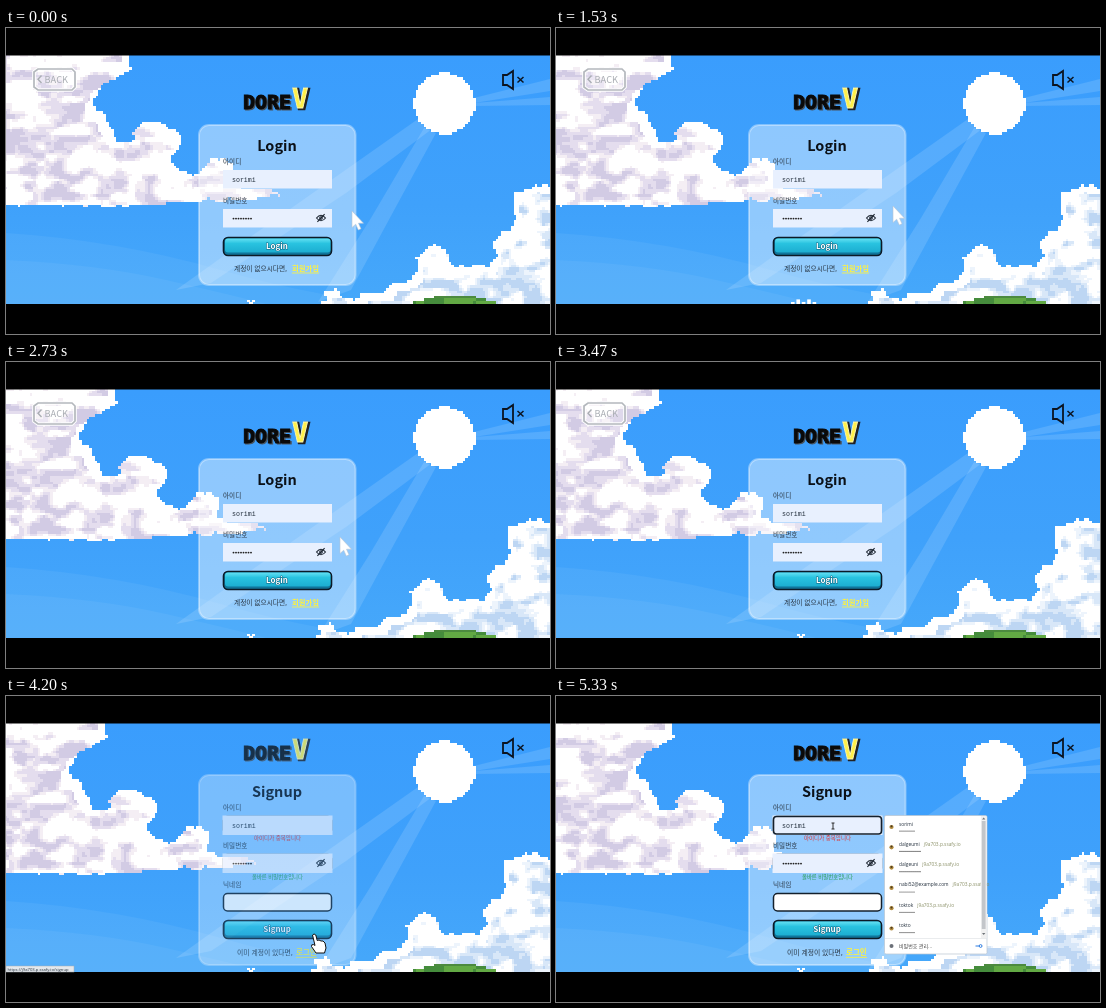
An HTML page with a canvas for the animation above (5390 ms loop, 544 px wide and 306 px high).

```html
<!DOCTYPE html>
<html lang="ko">
<head>
<meta charset="utf-8">
<title>Login</title>
<style>
  html, body { margin: 0; width: 100%; height: 100%; overflow: hidden; background: #000; }
  canvas, svg { position: absolute; left: 0; top: 0; width: 100%; height: 100%; display: block; }
  text { font-family: "Noto Sans CJK KR", "Noto Sans CJK", sans-serif; fill: #26323f; white-space: pre; }
  .mid { text-anchor: middle; }
  .mono { font-family: "Liberation Mono", monospace; font-size: 6.6px; }
  .logo { font-family: "DejaVu Sans Mono", monospace; font-weight: 700; }
  .title { font-size: 14.5px; font-weight: 700; fill: #0b1118; }
  .list { font-family: "Open Sans", sans-serif; font-size: 4.8px; }
</style>
</head>
<body>
<canvas id="sky" width="544" height="306"></canvas>
<svg id="ui" viewBox="0 0 544 306" preserveAspectRatio="none"></svg>
<script>
const LOOP = 5390, CELL = 2.6;
const $ = id => document.getElementById(id);
const ctx = $('sky').getContext('2d');

// ---------- pixel scenery ----------
const hash = (i, j) => { const s = Math.sin(i * 127.1 + j * 311.7) * 43758.5453; return s - Math.floor(s); };
const mix = (a, b, k) => a + (b - a) * k;
function noise(x, y) {
  const i = Math.floor(x), j = Math.floor(y), u = x - i, v = y - j;
  return mix(mix(hash(i, j), hash(i + 1, j), u), mix(hash(i, j + 1), hash(i + 1, j + 1), u), v);
}
function shape(d) { return new Path2D('M' + d + 'Z'); }

// Rasterises a path into coarse cells; ragged adds a jagged rim.
function sprite(path, color, ragged = 0) {
  const c = document.createElement('canvas');
  c.width = 240; c.height = 118;
  const g = c.getContext('2d');
  const inside = (x, y) => ctx.isPointInPath(path, x, y);
  for (let j = 10; j < 107; j++) for (let i = 0; i < 240; i++) {
    const x = (i + .5) * CELL - 40, y = (j + .5) * CELL;
    const w = ragged * (noise(x / 5, y / 5) - .5);
    if (!inside(x + w, y + w)) continue;
    g.fillStyle = color(x, y, inside);
    g.fillRect(i, j, 1, 1);
  }
  return c;
}
function stamp(s, dx) {
  ctx.drawImage(s, dx - 40, 0, s.width * CELL, s.height * CELL);
}

const leftCloud = sprite(shape(
  '-40 20 101 20 101 43 92 47 88 52 72 57 70 66 64 70 66 82 74 84 80 98 86 104 86 112 104 114 ' +
  '108 98 115 93 133 93 139 101 150 104 153 118 147 125 141 131 148 140 160 146 176 142 180 132 ' +
  '192 129 203 135 205 146 200 153 212 158 225 162 240 160 245 164 258 166 240 168 228 170 200 172 ' +
  '150 174 110 177 -40 178'),
  (x, y, inside) => {
    if (!inside(x + 9, y - 6) && y < 160) return '#fff';
    const n = noise(x / 15, y / 8) * .7 + noise(x / 6 + 9, y / 4) * .3 + (x < 75 && y > 60 ? .06 : 0);
    return n > .66 ? '#d2cbe4' : n > .56 ? '#e4ddee' : n > .49 ? '#f4eef4' : '#fff';
  }, 5);

const rightCloud = sprite(shape(
  '298 280 309 272 311 262 322 262 326 268 338 272 348 266 372 264 376 256 394 252 400 246 402 232 ' +
  '408 228 409 219 416 217 428 219 433 228 434 236 444 240 462 236 474 240 480 226 478 214 486 206 ' +
  '494 200 500 192 498 170 504 162 516 157 532 158 544 164 575 170 575 280'),
  (x, y, inside) => {
    if (!inside(x - 6, y - 8)) return '#fff';
    const n = noise(x / 14 + 3, y / 8) * .7 + noise(x / 6, y / 4) * .3 + (y > 240 ? .06 : 0);
    return n > .64 ? '#bdd6f3' : n > .54 ? '#d8e7f8' : n > .48 ? '#edf4fc' : '#fff';
  }, 5);

const disc = new Path2D();
disc.arc(438.5, 75.5, 30.5, 0, 7);
const sun = sprite(disc, () => '#fff');

const hill = sprite(shape('404 280 408 274 420 271 432 268 464 268 478 271 489 274 493 280'),
  (x, y) => y < 271 ? '#4c8a3f' : noise(x / 6, y / 3) > .5 ? '#62a944' : '#458c3c');

const rays = [
  '412 91 426 101 340 165 205 255 170 262 240 212',
  '418 100 430 105 392 175 345 262 312 274 365 190',
  '468 70 544 51 544 63 468 75',
  '468 75 544 69 544 77 468 78'
].map(shape);
const bands = [
  'M0 205Q110 212 215 242T400 276H0Z',
  'M0 232Q90 236 160 252T260 276H0Z'
].map(d => new Path2D(d));

function drawSky(x, tall) {
  ctx.imageSmoothingEnabled = false;
  const g = ctx.createLinearGradient(0, 28, 0, 276);
  g.addColorStop(0, '#3a9dfd');
  g.addColorStop(.6, '#3fa1fb');
  g.addColorStop(1, '#46a8fa');
  ctx.fillStyle = g;
  ctx.fillRect(0, 0, 544, 306);
  ctx.fillStyle = 'rgba(255,255,255,.05)';
  bands.forEach(b => ctx.fill(b));
  ctx.fillStyle = 'rgba(255,255,255,.13)';
  rays.forEach(r => ctx.fill(r));
  stamp(sun, 0);
  stamp(leftCloud, x - 101);
  stamp(rightCloud, (x - 101) * .42);
  stamp(hill, 0);
  ctx.fillStyle = '#fff';
  if (tall) for (let i = 0; i < 5; i++) ctx.fillRect(235 + i * 5.4, 274 - (i % 2) * 2.6, 3.6, 5);
  else { ctx.fillRect(241, 272, 3, 2); ctx.fillRect(246, 272, 3, 2); ctx.fillRect(243, 274, 4, 2); }
  ctx.fillStyle = '#000';
  ctx.fillRect(0, 0, 544, 27.5);
  ctx.fillRect(0, 276, 544, 30);
}

// ---------- interface ----------
const text = (x, y, s, size, attr = '') => `<text x="${x}" y="${y}" font-size="${size}" ${attr}>${s}</text>`;
const rect = (x, y, w, h, attr) => `<rect x="${x}" y="${y}" width="${w}" height="${h}" ${attr}/>`;
const dots = (x, y, n, r, gap) => Array.from({ length: n }, (_, i) =>
  `<circle cx="${x + i * gap}" cy="${y}" r="${r}" fill="#222"/>`).join('');

function logo(y) {
  const word = (dx, c) => text(237 + dx, y + dx, 'DORE', 20, `class="logo" style="fill:${c};stroke:${c}"`);
  const last = (dx, fill, line, w) => text(286 + dx, y - 1 + dx, 'V', 27,
    `class="logo" style="fill:${fill};stroke:${line};stroke-width:${w}"`);
  return word(1.3, '#4a5560') + word(0, '#0a0a0a') + last(1.4, '#222', '#222', 2.4) + last(0, '#fff04a', '#fffbb8', .9);
}
const card = (y, h) => rect(193, y + 1, 156.5, h - 2,
  'rx="10" fill="#fff" fill-opacity=".42" stroke="#fff" stroke-opacity=".35" stroke-width="2"');
const label = (y, s) => text(217, y + 2.4, s, 6.6);
const filled = y => rect(217, y, 109, 18.5, 'fill="#e8f0fe"');
const boxed = y => rect(217.5, y + .5, 108, 17.5, 'rx="4" fill="#fff" stroke="#14202c" stroke-width="1.5"');
const user = y => text(226, y + 11.6, 'sorimi', 6.6, 'class="mono"');
const eye = y => `<g transform="translate(315 ${y})" fill="none" stroke="#1b2430" stroke-width="1.1">
  <path d="M-4.5 0Q0-5.5 4.5 0Q0 5.5-4.5 0Z"/><circle r="1.3"/><path d="M-3.6 3.8L3.6-3.8"/></g>`;
const pass = y => dots(227.5, y + 9.6, 8, .95, 2.5) + eye(y + 9);
const button = (y, s) => rect(217.5, y + .5, 108, 18, 'rx="4.5" fill="#10759a" stroke="#0c1a26" stroke-width="1.6"') +
  rect(219, y + 1.6, 105.5, 14, 'rx="3" fill="url(#aqua)"') +
  text(271, y + 11.6, s, 8, 'class="mid" font-weight="700" style="fill:#fff;stroke:#0b5f7c;stroke-width:.9;paint-order:stroke"');
const link = (x, y, s, size, w) => text(x, y, s, size, 'font-weight="700" style="fill:#fff23c"') +
  rect(x, y + 1.6, w, .8, 'fill="#fff23c"');

const login = logo(81) + card(96, 162) + text(271, 122.5, 'Login', 14.5, 'class="title mid"') +
  label(134, '아이디') + filled(142) + user(142) +
  label(173, '비밀번호') + filled(181) + pass(181) +
  button(209, 'Login') + text(228, 243, '계정이 없으시다면,', 6.7) + link(286, 243, '회원가입', 7.3, 27) +
  `<g id="back"><path d="M32 41H66L69 44V59L66 62H32L28 59V44Z" fill="#fff" fill-opacity=".25" stroke="#fff" stroke-width="3.6"/>
   <path d="M32 41H66L69 44V59L66 62H32L28 59V44Z" fill="none" stroke="#b4b8bd" stroke-width="1.7"/>
   <path d="M35.5 47.5L32 51.2L35.5 55" fill="none" stroke="#a9adb3" stroke-width="1.4"/>` +
  text(38.5, 54.5, 'BACK', 9.3, 'font-weight="500" style="fill:#a9adb3"') + '</g>';

const signup = logo(63.5) + card(78, 192) + text(271, 100.5, 'Signup', 14.5, 'class="title mid"') +
  label(112, '아이디') + label(150, '비밀번호') + label(189, '닉네임') +
  boxed(120) + boxed(158) + boxed(197) + eye(167) +
  '<g id="auto">' + rect(216.5, 119.5, 110, 19.5, 'fill="#e8f0fe"') + user(120) +
  rect(216.5, 157.5, 110, 19.5, 'fill="#e8f0fe"') + pass(158) +
  text(271.5, 144.3, '아이디가 중복입니다', 5.5, 'class="mid" style="fill:#e0322f"') +
  text(271.5, 183.2, '올바른 비밀번호입니다', 5.4, 'class="mid" style="fill:#1f9a4c"') + '</g>' +
  '<rect id="focus" x="217.5" y="120.5" width="108" height="17.5" rx="3" fill="none" stroke="#14202c" stroke-width="1.6"/>' +
  button(224, 'Signup') + text(231, 259, '이미 계정이 있다면,', 6.8) + link(290, 259.3, '로그인', 7.5, 21);

const host = 'j9a703.p.ssafy.io';
const accounts = [['sorimi', 0], ['dalgeumi', 1], ['dalgeuni', 1], ['nabi52@example.com', 1], ['toktok', 1], ['tokto', 0]];
const popup = rect(328.5, 119.5, 102.5, 138.5, 'rx="1.5" fill="#fff" stroke="#b9c4d0" stroke-width=".7"') +
  accounts.map(([name, far], i) => {
    const y = 129.5 + i * 20.3;
    return `<circle cx="335.5" cy="${y + 1.5}" r="2.1" fill="#b08a3c"/><circle cx="335.5" cy="${y + .8}" r="1" fill="#4a3a22"/>` +
      `<text x="343" y="${y}" class="list">${name}${far ? `<tspan dx="4" fill="#8a8f66">${host}</tspan>` : ''}</text>` +
      dots(344, y + 5.6, i == 1 || i == 2 ? 11 : 8, .6, 2);
  }).join('') +
  rect(425, 120, 5.5, 122, 'fill="#f1f1f1"') + rect(425.8, 125, 3.8, 108, 'fill="#c3c6ca"') +
  '<path d="M426 123.5l1.7-2 1.7 2zM426 237l1.7 2 1.7-2z" fill="#70757a"/>' +
  rect(329, 242, 101.5, .6, 'fill="#dcdfe3"') +
  '<circle cx="335.5" cy="250" r="2" fill="#6b7078"/>' + text(343, 252, '비밀번호 관리...', 5, 'style="fill:#444"') +
  '<path d="M419.5 250h4m2.5 0a1.4 1.4 0 1 0-2.8 0a1.4 1.4 0 1 0 2.8 0" fill="none" stroke="#2f7de1"/>';

$('ui').innerHTML = `
  <defs><linearGradient id="aqua" x2="0" y2="1"><stop stop-color="#63e0f2"/><stop offset=".35" stop-color="#29c3e0"/><stop offset="1" stop-color="#1cadd0"/></linearGradient></defs>
  <g fill="none" stroke="#0c1420"><path d="M497 47h4l6-4v18l-6-4h-4z" stroke-width="1.8"/><path d="M511.5 49l6 5.5m0-5.5l-6 5.5" stroke-width="1.5"/></g>
  <g id="login">${login}</g><g id="signup">${signup}</g><g id="popup">${popup}</g>
  <g id="status">${rect(0, 270, 68, 6, 'fill="#e4e8ec" stroke="#a4abb3" stroke-width=".5"')}
    ${text(1.5, 274.7, 'https://' + host + '/signup', 4.2, 'class="list" style="font-size:4.2px"')}</g>
  <g id="mouse">
    <path id="arrow" d="M0 0V16.5L3.7 13.2L6.3 19L9 17.8L6.5 12.2H11.5Z" fill="#fff" stroke="#b8c4d4" stroke-width=".6"/>
    <path id="hand" d="M-2.5 0Q-1-2 .8 0L2.2 5.5L4 5L6 6L8 6L10 8L11 13L9.5 18H1L-3.5 11.5Q-4 9-1.2 9.6L0 10.5Z" fill="#fff" stroke="#111" stroke-width="1"/>
    <path id="beam" d="M-1.5-.5h3M0-.5v6M-1.5 5.5h3" fill="none" stroke="#1a1a1a" stroke-width=".9"/>
  </g>`;

// ---------- timeline ----------
const drift = [[0, 124], [330, 121], [730, 118.5], [1530, 116], [1930, 114], [2330, 112], [2730, 110],
  [2930, 107], [3270, 104], [3670, 101], [4070, 100], [4470, 123], [4870, 120], [5270, 117]];
const path = [[0, 346, 183], [600, 339, 179], [1000, 337, 178], [1730, 337, 178], [2530, 334, 175], [2870, 334, 175],
  [3070, 330, 192], [3400, 311, 238], [3530, 309, 239], [4400, 309, 239], [4600, 275, 143], [5000, 277, 127.5], [LOOP, 277, 127.5]];

const show = (id, on) => $(id).setAttribute('visibility', on ? 'inherit' : 'hidden');
let last = -1;

function frame() {
  const t = performance.now() % LOOP;
  const step = drift.findLastIndex(d => d[0] <= t);
  if (step !== last) drawSky(drift[last = step][1], step == 3 || step == 9);

  show('login', t < 3790);
  $('signup').setAttribute('opacity', Math.max(0, Math.min(1, (t - 3790) / 560)));
  show('auto', t >= 4130);
  show('focus', t >= 5070);
  show('popup', t >= 5070);
  show('status', t >= 3530 && t < 4400);

  const k = path.findIndex(p => p[0] > t), a = path[k - 1], b = path[k], u = (t - a[0]) / (b[0] - a[0]);
  $('mouse').setAttribute('transform', `translate(${mix(a[1], b[1], u)} ${mix(a[2], b[2], u)})`);
  const hand = t >= 3530 && t < 4400, beam = t >= 4930;
  show('hand', hand);
  show('beam', beam);
  show('arrow', !hand && !beam && !(t >= 3400 && t < 3530));
  requestAnimationFrame(frame);
}
frame();
</script>
</body>
</html>
```
